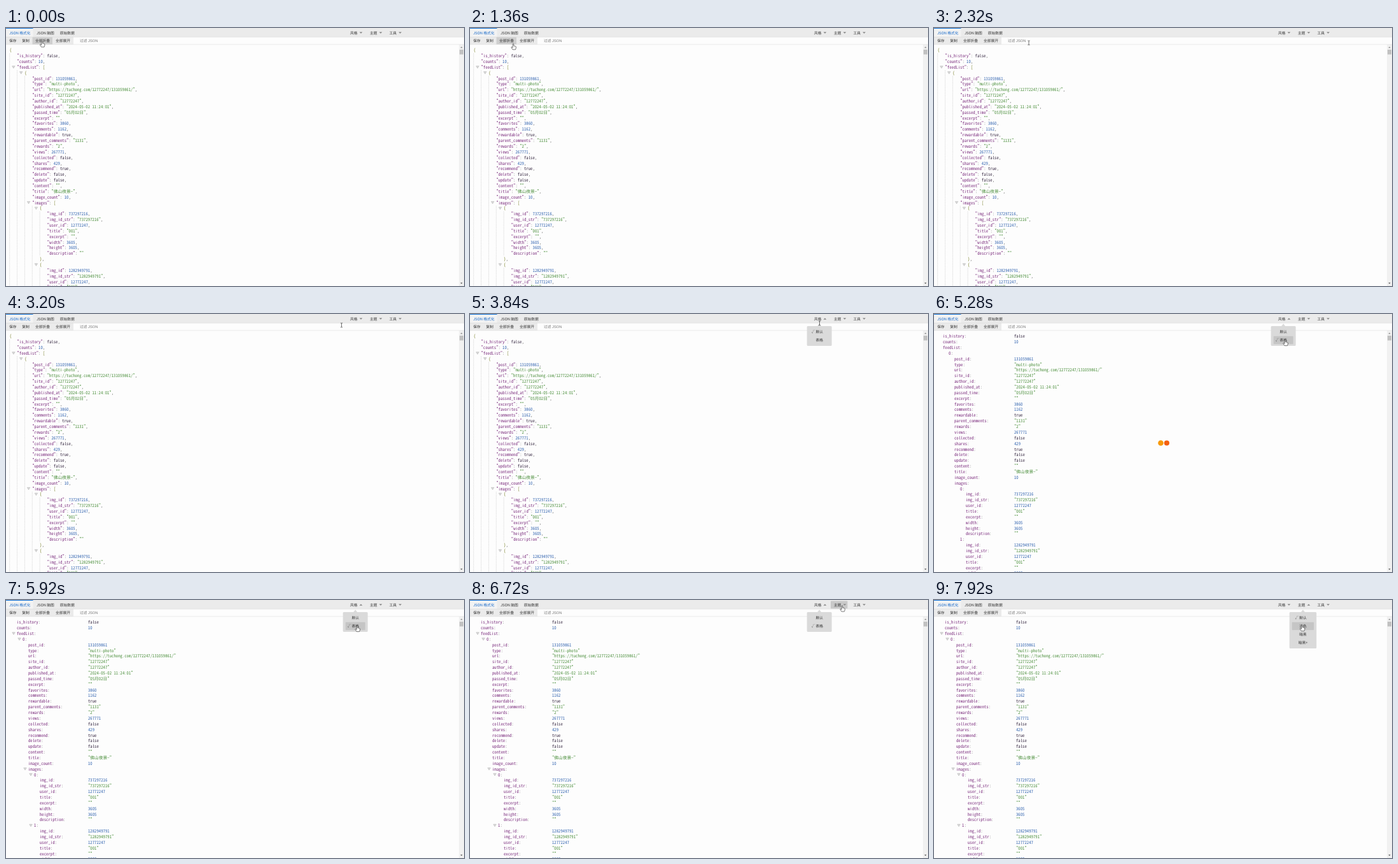
An HTML page that plays this animation: 720 px wide and 405 px high, repeating every 8000 ms.

```html
<!DOCTYPE html>
<html lang="zh-CN">
<head>
<meta charset="utf-8">
<title>JSON</title>
<style>
html, body { margin: 0; width: 100%; height: 100%; overflow: hidden; background: #fdfdfd; }
svg { display: block; width: 720px; height: 405px; }
text { white-space: pre; text-rendering: geometricPrecision; }
.ui { font: 5.75px "Noto Sans CJK SC", "Noto Sans CJK", "Noto Sans", sans-serif; fill: #333; }
.code { font-family: "Noto Sans Mono CJK SC", "Liberation Mono", monospace; }
.key { fill: #7b2c7d; }
.num { fill: #3264b0; }
.str { fill: #4b8f3c; }
.bool { fill: #33253f; }
.brace { fill: #747b22; }
.punct { fill: #555; }
.mid { text-anchor: middle; }
</style>
</head>
<body>
<svg id="stage" viewBox="0 0 720 405"></svg>
<script>
const LOOP = 8000, ROW = 8.86, TOP = 35, BOTTOM = 412, ADVANCE = 3.37;
const stage = document.getElementById('stage');

function el(parent, tag, attrs = {}, text) {
  const node = document.createElementNS('http://www.w3.org/2000/svg', tag);
  for (const k in attrs) node.setAttribute(k, attrs[k]);
  if (text !== undefined) node.textContent = text;
  parent.appendChild(node);
  return node;
}
const group = (parent = stage) => el(parent, 'g');
const rect = (p, x, y, width, height, fill, rx = 0) => el(p, 'rect', { x, y, width, height, fill, rx });
const label = (p, x, y, s, attrs = {}) => el(p, 'text', { class: 'ui', x, y: y + 2.1, ...attrs }, s);
const path = (p, d, fill, attrs = {}) => el(p, 'path', { d, fill, ...attrs });
const show = (node, on) => node.setAttribute('visibility', on ? 'inherit' : 'hidden');

// Document shown in both views
const image = id => ({
  img_id: id, img_id_str: String(id), user_id: 12772247, title: '001',
  excerpt: '', width: 3605, height: 3605, description: ''
});
const data = {
  is_history: false,
  counts: 10,
  feedList: [{
    post_id: 131059861,
    type: 'multi-photo',
    url: 'https://tuchong.com/12772247/131059861/',
    site_id: '12772247',
    author_id: '12772247',
    published_at: '2024-05-02 11:24:01',
    passed_time: '05月02日',
    excerpt: '',
    favorites: 3860,
    comments: 1162,
    rewardable: true,
    parent_comments: '1131',
    rewards: '2',
    views: 267771,
    collected: false,
    shares: 429,
    recommend: true,
    delete: false,
    update: false,
    content: '',
    title: '佛山夜景~',
    image_count: 10,
    images: [image(737297216), image(1282949791)]
  }]
};
const kind = v => ({ number: 'num', string: 'str' })[typeof v] || 'bool';
const isNode = v => typeof v === 'object';

// Font size that gives the wanted character advance
const probe = el(stage, 'text', { class: 'code', 'font-size': 100 }, '0'.repeat(20));
const codeSize = ADVANCE * 2000 / probe.getComputedTextLength();
probe.remove();

function codeLine(p, x, y, parts) {
  const t = el(p, 'text', { class: 'code', 'font-size': codeSize, x, y: y + 2.3 });
  for (const [cls, s] of parts) el(t, 'tspan', { class: cls }, s);
}
const toggle = (p, x, y) => path(p, `M${x - 2.2} ${y - 1.9}h4.4l-2.2 3.6z`, '#dcdcdc',
  { stroke: '#aaa', 'stroke-width': .5 });

function treeView(p) {
  let row = 0;
  const x = depth => 5.6 + depth * 11.85;
  const y = () => TOP + row * ROW;
  function walk(v, depth, key, last) {
    if (y() > BOTTOM) return;
    const head = key === undefined ? [] : [['key', `"${key}"`], ['punct', ': ']];
    const comma = ['punct', last ? '' : ','];
    if (!isNode(v)) {
      codeLine(p, x(depth), y(), [...head, [kind(v), JSON.stringify(v)], comma]);
      row++;
      return;
    }
    const list = Array.isArray(v), keys = Object.keys(v);
    codeLine(p, x(depth), y(), [...head, ['brace', list ? '[' : '{']]);
    if (depth) toggle(p, x(depth) - 5.6, y());
    const from = y() + 5;
    row++;
    keys.forEach((k, i) => walk(v[k], depth + 1, list ? undefined : k, i === keys.length - 1));
    el(p, 'line', { x1: x(depth) + .1, x2: x(depth) + .1, y1: from, y2: Math.min(y() - 5, 405),
      stroke: '#bbb', 'stroke-width': .6, 'stroke-dasharray': '1.2 1.2' });
    if (y() > BOTTOM) return;
    codeLine(p, x(depth), y(), [['brace', list ? ']' : '}'], comma]);
    row++;
  }
  walk(data, 0, undefined, true);
}

function tableView(p, toggles) {
  let row = 0;
  function walk(obj, depth) {
    for (const k in obj) {
      const v = obj[k], x = 17 + depth * 9, y = TOP + row * ROW;
      if (y > BOTTOM) return;
      codeLine(p, x, y, [['key', k], ['punct', ':']]);
      row++;
      if (isNode(v)) {
        toggle(toggles, x - 5, y);
        walk(v, depth + 1);
      } else {
        codeLine(p, 129, y, [[kind(v), JSON.stringify(v)]]);
      }
    }
  }
  walk(data, 0);
}

const tree = group();
treeView(tree);
const table = group(), tableToggles = group(table);
tableView(table, tableToggles);

// Loader balls
const loader = group();
const ballB = el(loader, 'circle', { cy: 202.5, fill: '#f4600f' });
const ballA = el(loader, 'circle', { cy: 202.5, fill: '#f79a0b' });

// Scrollbar
rect(stage, 712, 26, 8, 379, '#f1f1f1');
rect(stage, 713, 34, 6, 7.5, '#c1c1c1');
path(stage, 'M714.3 31.2h3.4l-1.7-2z', '#888');
path(stage, 'M714.3 399.8h3.4l-1.7 2z', '#555');

// Header and toolbar
rect(stage, 0, 0, 720, 14, '#ebebeb');
rect(stage, 0, 0, 42.5, 14, '#f3f3f3');
rect(stage, 0, 0, 42.5, 1, '#1473d8');
rect(stage, 0, 14, 720, 12, '#fdfdfd');
rect(stage, 0, 14, 106, 12, '#ebebeb');
rect(stage, 0, 13.8, 720, .6, '#d8d8d8');
rect(stage, 0, 25.6, 720, .6, '#dcdcdc');
label(stage, 5, 7.6, 'JSON 格式化', { style: 'fill:#1668c8' });
label(stage, 48, 7.6, 'JSON 脑图');
label(stage, 84.7, 7.6, '原始数据');
const foldHover = rect(stage, 41.5, 14.4, 31.5, 11.2, '#cfcfcf');
[['保存', 5], ['复制', 25.2], ['全部折叠', 46], ['全部展开', 78]]
  .forEach(([s, x]) => label(stage, x, 19.9, s));
label(stage, 116, 20, '过滤 JSON',
  { style: 'font-family:"Liberation Sans","Noto Sans CJK SC",sans-serif;fill:#777' });

const tabs = [['风格', 541], ['主题', 572], ['工具', 602.6]].map(([s, x]) => {
  const hover = rect(stage, x - 5, 1.5, 26.5, 12, '#c9c9c9', 1);
  label(stage, x, 7.4, s);
  const ax = x + 17;
  const down = path(stage, `M${ax - 2.4} 6.2h4.8l-2.4 2.6z`, '#8a8a8a');
  const up = path(stage, `M${ax - 2.4} 8.8h4.8l-2.4-2.6z`, '#8a8a8a');
  return { x, hover, down, up };
});

function dropdown(cx, width, items) {
  const g = group(), left = cx - width / 2;
  rect(g, left, 19, width, items.length * 13 + 5, '#dadada', 1.5);
  path(g, `M${cx - 3.2} 19.2h6.4l-3.2-4z`, '#dadada');
  const hover = rect(g, left + 4, 21.8, width - 8, 12.4, '#c5c5c5', 1);
  const check = label(g, cx - 12.5, 28, '√', { style: 'fill:#555' });
  items.forEach((s, i) => label(g, cx, 28 + i * 13, s, { class: 'ui mid' }));
  return { g, hover, check, left, width, count: items.length };
}
const styleMenu = dropdown(549.2, 39, ['默认', '表格']);
const themeMenu = dropdown(580, 42.5, ['默认', '浅色', '暗黑', '暗黑+']);

// Pointers, each with its hot spot at 0,0
const ink = { stroke: '#222', 'stroke-width': .6, 'stroke-linejoin': 'round' };
const hand = path(stage, 'M-.8 .5Q0-.5 .8 .5V3.6L2 3.7 3.2 4.1 4.3 4.7V7L3.5 9.4H-.9L-3 6.2Q-3.3 5-2.2 5.2L-.8 6.3Z', '#fff', ink);
const arrow = path(stage, 'M0 0V8L1.9 6.3 3.1 9 4.3 8.5 3.1 5.8H5.6Z', '#fff', ink);
const beam = path(stage, 'M-1.6-3.3H-.4L0-2.9 .4-3.3H1.6M0-2.9V2.9M-1.6 3.3H-.4L0 2.9 .4 3.3H1.6', 'none',
  { stroke: '#333', 'stroke-width': .7 });

// time, x, y of the pointer
const route = [
  [0, 56.5, 20.5], [240, 56.5, 20.5], [1280, 68, 24.5], [2000, 68, 24.5],
  [3200, 527.5, 17.5], [3440, 549, 9], [3700, 549, 9], [4240, 552, 40.3],
  [5900, 552, 40.3], [6640, 585, 8.7], [6900, 585, 8.7], [7520, 578.5, 39.3], [LOOP, 578.5, 39.3]
];
const OPEN = 3520, PICK = 4480, RENDER = 4800, READY = 5920, THEME = 6800;

function pointerAt(t) {
  const i = Math.max(1, route.findIndex(r => r[0] > t));
  const [t0, x0, y0] = route[i - 1], [t1, x1, y1] = route[i];
  const u = (t - t0) / (t1 - t0), e = u * u * (3 - 2 * u);
  return [x0 + (x1 - x0) * e, y0 + (y1 - y0) * e];
}

function hoverMenu(menu, open, x, y) {
  const i = Math.floor((y - 21.5) / 13);
  const on = open && x > menu.left && x < menu.left + menu.width && i >= 0 && i < menu.count;
  show(menu.g, open);
  show(menu.hover, on);
  menu.hover.setAttribute('y', 21.8 + i * 13);
  return on;
}

function draw(t) {
  const [x, y] = pointerAt(t);
  const styleOpen = t >= OPEN && t < THEME, themeOpen = t >= THEME;
  const loading = t >= RENDER && t < READY;

  show(tree, t < RENDER);
  show(table, t >= RENDER);
  show(tableToggles, t >= READY);
  table.setAttribute('transform', `translate(${loading ? -3 : 0} 0)`);

  show(loader, loading);
  const a = (t - 5280) / 1000 * Math.PI * 2;
  const dx = 4.7 * Math.cos(a), grow = .35 * Math.sin(a);
  ballA.setAttribute('cx', 361.2 - dx);
  ballB.setAttribute('cx', 361.2 + dx);
  ballA.setAttribute('r', 4.3 + grow);
  ballB.setAttribute('r', 4.1 - grow);

  let link = hoverMenu(styleMenu, styleOpen, x, y);
  link = hoverMenu(themeMenu, themeOpen, x, y) || link;
  styleMenu.check.setAttribute('y', (t < PICK ? 28 : 41) + 2.1);

  tabs.forEach((tab, i) => {
    const on = y < 14 && x > tab.x - 5 && x < tab.x + 21.5;
    const open = [styleOpen, themeOpen, false][i];
    show(tab.hover, on);
    show(tab.up, open);
    show(tab.down, !open);
    link = link || on;
  });

  const inBar = y >= 14 && y < 26;
  show(foldHover, inBar && x > 41.5 && x < 73);
  link = link || (inBar && x < 106);
  const typing = !link && inBar;
  show(hand, link);
  show(beam, typing);
  show(arrow, !link && !typing);
  for (const c of [hand, beam, arrow]) c.setAttribute('transform', `translate(${x} ${y})`);
}

const start = performance.now();
function tick() {
  draw((performance.now() - start) % LOOP);
  requestAnimationFrame(tick);
}
tick();
</script>
</body>
</html>
```
